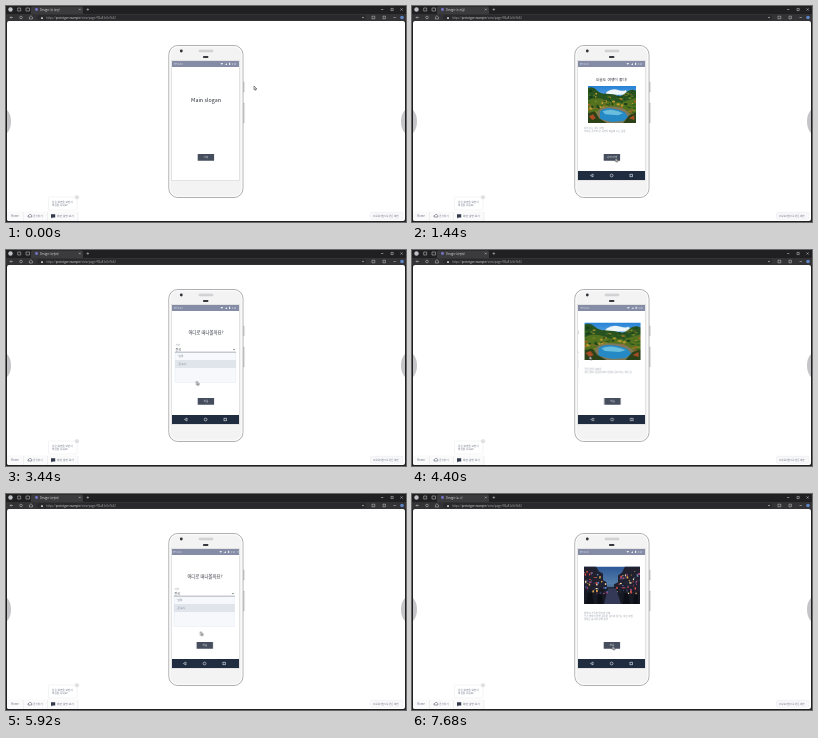
Write an HTML page that moves like this. It is 400 px wide and 216 px high and loops after 8 s.

```html
<!DOCTYPE html>
<html lang="ko">
<head>
<meta charset="utf-8">
<title>Prototype preview</title>
<style>
html, body { margin: 0; width: 100%; height: 100%; overflow: hidden; background: #fff; }
svg { display: block; }
#stage { width: 400px; height: 216px; }
text { font-family: 'Noto Sans CJK KR', 'Noto Sans', sans-serif; font-size: 2.6px; fill: #697080; }
.mid { text-anchor: middle; }
.head { font-weight: 500; fill: #252a33; text-anchor: middle; }
.note { font-size: 2.4px; fill: #959aa5; }
.btn text { fill: #e8ebf0; text-anchor: middle; }
.tab { font-size: 2.8px; fill: #dcdcdc; visibility: hidden; }

/* One percent of the loop is 80 ms. */
.page, .tab, #cursor { animation: 8s linear infinite; }
#start { animation-name: start; }
#intro { animation-name: intro; }
#pick { animation-name: pick; }
#island { animation-name: island; }
#city { animation-name: city; }
#cursor { animation-name: cursor; }
.tab { animation-timing-function: step-end; }
#tab0 { animation-name: tab0; }
#tab1 { animation-name: tab1; }
#tab2 { animation-name: tab2; }
#tab3 { animation-name: tab3; }
#tab4 { animation-name: tab4; }

@keyframes start {
  0%, 10.25% { transform: none; animation-timing-function: ease; }
  16.4%, 100% { transform: translateX(-20px); }
}
@keyframes intro {
  0%, 10.25% { transform: translateX(67px); animation-timing-function: ease; }
  16.4%, 29.03% { transform: translateX(0); animation-timing-function: ease; }
  35.15%, 100% { transform: translateX(-20px); }
}
@keyframes pick {
  0%, 29.03% { transform: translateX(67px); animation-timing-function: ease; }
  35.15%, 49.6% { transform: translateX(0); animation-timing-function: ease; }
  55.75%, 69.65% { transform: translateX(-20px); animation-timing-function: ease; }
  75.8%, 100% { transform: translateX(0); }
}
@keyframes island {
  0%, 49.6% { transform: translateX(67px); animation-timing-function: ease; }
  55.75%, 69.65% { transform: translateX(0); animation-timing-function: ease; }
  75.8%, 100% { transform: translateX(67px); }
}
@keyframes city {
  0%, 85.96% { transform: translateX(67px); }
  85.97% { transform: translateX(1.6px); }
  86.95%, 100% { transform: translateX(0); }
}
@keyframes cursor {
  0%, 0.5% { transform: translate(248px, 80px); animation-timing-function: ease-in-out; }
  6%, 19.5% { transform: translate(203.5px, 152px); animation-timing-function: ease-in-out; }
  23%, 39.5% { transform: translate(201px, 151.5px); animation-timing-function: ease-in-out; }
  47%, 58.5% { transform: translate(177.5px, 106px); animation-timing-function: ease-in-out; }
  64%, 65.5% { transform: translate(199.5px, 151px); }
  68%, 71% { transform: translate(201px, 151.5px); animation-timing-function: ease-in-out; }
  78%, 80.5% { transform: translate(184px, 115px); animation-timing-function: ease-in-out; }
  83%, 90.5% { transform: translate(179px, 113px); animation-timing-function: ease-in-out; }
  96%, 100% { transform: translate(200.5px, 152px); }
}
@keyframes tab0 { 0% { visibility: visible; } 17%, 100% { visibility: hidden; } }
@keyframes tab1 { 0% { visibility: hidden; } 17% { visibility: visible; } 35%, 100% { visibility: hidden; } }
@keyframes tab2 {
  0% { visibility: hidden; } 35% { visibility: visible; } 56% { visibility: hidden; }
  73% { visibility: visible; } 89%, 100% { visibility: hidden; }
}
@keyframes tab3 { 0% { visibility: hidden; } 56% { visibility: visible; } 73%, 100% { visibility: hidden; } }
@keyframes tab4 { 0% { visibility: hidden; } 89%, 100% { visibility: visible; } }
</style>
</head>
<body>
<svg id="stage" viewBox="0 0 400 216">
  <defs>
    <clipPath id="screen"><rect x="166" y="55" width="67" height="119"/></clipPath>
    <linearGradient id="sky" x2="0" y2="1"><stop stop-color="#2582d6"/><stop offset="1" stop-color="#d6ebf7"/></linearGradient>
    <linearGradient id="dusk" x2="0" y2="1"><stop stop-color="#2d5796"/><stop offset=".45" stop-color="#547da9"/><stop offset="1" stop-color="#171824"/></linearGradient>

    <symbol id="lagoon" viewBox="0 0 56 38" preserveAspectRatio="none">
      <rect width="56" height="38" fill="url(#sky)"/>
      <path d="M22 6q6-4 13-2t9 0l3 5H20z" fill="#eef5f8"/>
      <path d="M0 2q6-2 10 2t12 4 12 2 10-3 12-2v33H0z" fill="#285321"/>
      <path d="M0 15q10-5 21 0t35-3v26H0z" fill="#55721f"/>
      <g id="leaves"/>
      <path d="M12 25q4-4 14-4t17 3l7 5-3 9H10l-2-5z" fill="#80785a"/>
      <path d="M14 26q5-4 14-3t15 4l4 5-6 4-13 1-14-3z" fill="#2489c4"/>
      <path d="M17 26q10-4 24 2l-6 2-15-1z" fill="#69bddd"/>
      <path d="M0 28l8-2 5 7 9 5H0zM56 27l-8 3-7 8h15z" fill="#2b4218"/>
      <path d="M1 31l5-2 3 4-4 2zM48 33l6-3v5z" fill="#a94b25"/>
    </symbol>

    <symbol id="night" viewBox="0 0 56 38" preserveAspectRatio="none">
      <rect width="56" height="38" fill="url(#dusk)"/>
      <path d="M0 0h12l3 5 4 2v7l4 2v9H0zM56 0H41l-3 6-4 3v7l-4 2v7h26z" fill="#20202e"/>
      <path d="M0 24l23-3h9l24 4v13H0z" fill="#171923"/>
      <path d="M24 22h8l5 16H20z" fill="#343957"/>
      <g id="lights"/>
      <path d="M2 38l2-11 4-1 2 12zM13 38l1-10h4l1 10zM39 38l1-11h4l2 11zM49 38l1-9h4v9z" fill="#0d0f17"/>
    </symbol>

    <g id="bar">
      <rect x="166" y="55" width="67" height="6" fill="#858ca6"/>
      <text x="168" y="59" style="font-size:2.3px;fill:#e6e8ef">PM 5:20</text>
      <path d="M214.5 57h2.6l-1.3 2zM219 59l2-2v2zM223 56.8h1.2v2.3H223z" fill="#eef0f5"/>
      <text x="226" y="59" style="font-size:2.2px;fill:#eef0f5">5:20</text>
    </g>
    <g id="nav">
      <rect x="166" y="165" width="67" height="9" fill="#202c3f"/>
      <g fill="none" stroke="#e8ebf0" stroke-width=".6">
        <path d="M181 168l-2.5 1.5 2.5 1.5z"/>
        <circle cx="199.6" cy="169.5" r="1.4"/>
        <rect x="218" y="168.2" width="2.6" height="2.6"/>
      </g>
    </g>
    <g id="blank"><rect x="166" y="55" width="67" height="119" fill="#fff"/><use href="#bar"/></g>
    <rect id="key" x="191.7" y="148" width="16.4" height="6.8" rx=".4" fill="#464e5d"/>
  </defs>

  <!-- browser -->
  <rect width="400" height="216" fill="#202022"/>
  <path d="M0 8h400v7H0z" fill="#333335"/>
  <path d="M25 8V2q0-1.5 1.5-1.5h49Q77 .5 77 2v6z" fill="#3b3b3d"/>
  <circle cx="4.5" cy="3.5" r="2.2" fill="#bfc2c6"/>
  <path d="M11.7 2h3v3h-3zM20 2h3.5v3H20z" fill="none" stroke="#b4b4b4" stroke-width=".6"/>
  <circle cx="30.5" cy="3.5" r="1.4" fill="#7676d0"/>
  <text class="tab" id="tab0" x="34" y="4.6">Design (첫 화면)</text>
  <text class="tab" id="tab1" x="34" y="4.6">Design (소개글)</text>
  <text class="tab" id="tab2" x="34" y="4.6">Design (여행지)</text>
  <text class="tab" id="tab3" x="34" y="4.6">Design (섬)</text>
  <text class="tab" id="tab4" x="34" y="4.6">Design (도시)</text>
  <g fill="none" stroke="#c4c4c4" stroke-width=".55">
    <path d="M73 2.7l1.6 1.6m0-1.6L73 4.3M80.5 3.5h2.6m-1.3-1.3v2.6M375 3.5h2.4M385 2.4h2.2v2.2H385zM394.5 2.4l2.2 2.2m0-2.2l-2.2 2.2"/>
    <path d="M7 11.5H4m1.2-1.2L4 11.5l1.2 1.2M23.4 13v-2l1.5-1.2 1.5 1.2v2z"/>
    <circle cx="15" cy="11.5" r="1.3"/>
    <path d="M366 10.2h2.8v2.6H366zM377 10.2h2.4v2.6H377zM387.5 11.5h2.4"/>
  </g>
  <rect x="31" y="9" width="329" height="5" rx="2.5" fill="#29292b"/>
  <path d="M35 11.3h2v1.6h-2z" fill="#bbb"/>
  <circle cx="357" cy="11.5" r=".8" fill="#aaa"/>
  <circle cx="396" cy="11.5" r="1.8" fill="#5e87c9"/>
  <text x="40" y="12.6" style="font-size:2.8px;fill:#a9a9ab">https://<tspan fill="#dedede">prototype.example</tspan>/view/page/4f2a81c0e7b52</text>
  <rect x="1" y="15" width="398" height="200" rx="2" fill="#fff"/>

  <!-- viewer controls -->
  <path d="M1 104q4 4 4 11.5T1 127zM399 104q-4 4-4 11.5t4 11.5z" fill="#c5c5c7"/>
  <path d="M1 205.5h71V215H3q-2 0-2-2z" fill="#fafafb"/>
  <path d="M17.5 206v9M41.5 206v9M72 206v9" stroke="#e7e8ec" stroke-width=".6"/>
  <text x="5" y="211.2" style="font-size:2.8px">Home</text>
  <path d="M22 211q-.6-1.6 1-1.8.6-1.6 2-.4 1.4.4.8 2.2z" fill="none" stroke="#555d6b" stroke-width=".6"/>
  <text x="27" y="211.2">공유하기</text>
  <path d="M45 208.3h4.2v3.2h-2.5l-1.2 1v-1H45z" fill="#30384a"/>
  <text x="51" y="211.2" style="font-size:2.75px">화면 설명 보기</text>
  <rect x="42.5" y="191" width="28.5" height="13" rx="1" fill="#fff" stroke="#e8e9ed" stroke-width=".5"/>
  <text x="46" y="196.6" fill="#555d6b">같은 화면을 보면서</text>
  <text x="46" y="200.4">의견을 나눠요!</text>
  <circle cx="71" cy="191.2" r="1.8" fill="#f2f2f4" stroke="#c5c7cc" stroke-width=".4"/>
  <path d="M70.4 190.6l1.2 1.2m0-1.2l-1.2 1.2" stroke="#888" stroke-width=".35"/>
  <rect x="364.5" y="206.3" width="32.5" height="7" rx="1" fill="#f8f8fa" stroke="#e5e6ea" stroke-width=".4"/>
  <text x="367" y="211" style="font-size:2.4px">프로토타입으로 만든 화면</text>

  <!-- phone -->
  <path d="M237.2 76h1v10h-1zM237.2 97h1v20h-1z" fill="#ddd" stroke="#aaa" stroke-width=".4"/>
  <rect x="162.8" y="39.5" width="74.2" height="152" rx="9" fill="#f3f3f4" stroke="#a9a9ab" stroke-width=".9"/>
  <rect x="164" y="40.7" width="71.8" height="149.6" rx="8" fill="none" stroke="#fff" stroke-width=".8"/>
  <circle cx="175.3" cy="45" r="1.4" fill="#303135"/>
  <rect x="193" y="44" width="14" height="1.9" rx=".9" fill="#dadadd" stroke="#b5b5b8" stroke-width=".4"/>
  <rect x="197" y="50" width="5.4" height="2" rx=".7" fill="#37383c"/>
  <rect x="165.7" y="54.7" width="67.6" height="119.6" fill="#fff" stroke="#cfcfd2" stroke-width=".5"/>

  <g clip-path="url(#screen)">
    <g class="page" id="start">
      <use href="#blank"/>
      <text class="head" x="200" y="95.6" style="font-size:5.3px">Main slogan</text>
      <g class="btn"><use href="#key"/><text x="200" y="152.4">시작</text></g>
    </g>
    <g class="page" id="intro">
      <use href="#blank"/><use href="#nav"/>
      <text class="head" x="199.5" y="75" style="font-size:3.8px">오늘도 여행이 좋다!</text>
      <use href="#lagoon" x="176" y="80" width="48" height="37"/>
      <text class="note" x="172" y="122.8">쉬어 가는 하루 여행</text>
      <text class="note" x="172" y="126.2">가까운 곳부터 먼 곳까지 마음에 드는 길을</text>
      <g class="btn"><use href="#key"/><text x="200" y="152.4">나의 여행</text></g>
    </g>
    <g class="page" id="pick">
      <use href="#blank"/><use href="#nav"/>
      <text class="head" x="200" y="83.5" style="font-size:4.35px">어디로 떠나볼까요?</text>
      <text class="note" x="169.5" y="96.2">지역</text>
      <text x="169.5" y="100.7" style="font-size:3px;font-weight:500;fill:#30343c">전국</text>
      <path d="M227 99h2l-1 1.2z" fill="#555"/>
      <rect x="169" y="102" width="61" height="30.5" fill="#f6f8fc" stroke="#e2e6ed" stroke-width=".4"/>
      <path d="M169 102.2h61" stroke="#858b97" stroke-width=".6"/>
      <rect x="169" y="110" width="61" height="8" fill="#e0e5ec"/>
      <text x="172.5" y="107.3">남쪽</text>
      <text x="172.5" y="115.2">큰 도시</text>
      <g class="btn"><use href="#key"/><text x="200" y="152.4">처음</text></g>
    </g>
    <g class="page" id="island">
      <use href="#blank"/><use href="#nav"/>
      <use href="#lagoon" x="172" y="72.5" width="56" height="37.5"/>
      <text class="note" x="172" y="119.9">푸른 남쪽 섬마을</text>
      <text class="note" x="172" y="123.4">맑은 물과 숲길을 따라 천천히 걸어 보는 하루 길</text>
      <g class="btn"><use href="#key"/><text x="200" y="152.4">처음</text></g>
    </g>
    <g class="page" id="city">
      <use href="#blank"/><use href="#nav"/>
      <use href="#night" x="172" y="72.5" width="56" height="37.5"/>
      <text class="note" x="172" y="119.9">불빛이 가득한 밤거리 산책</text>
      <text class="note" x="172" y="123.1">늦은 밤까지 환한 골목을 걸으며 즐기는 작은 여행</text>
      <text class="note" x="172" y="126.3">맛있는 음식과 강변 풍경</text>
      <g class="btn"><use href="#key"/><text x="200" y="152.4">처음</text></g>
    </g>
  </g>

  <path id="cursor" d="M0 0v3.7l.9-.8.6 1.4.7-.3-.6-1.3h1.2z" fill="#fff" stroke="#222" stroke-width=".5"/>
</svg>
<script>
let seed = 7;
const rand = () => (seed = seed * 16807 % 2147483647) / 2147483647;
const pickFrom = list => list[Math.floor(rand() * list.length)];

function add(parent, name, attrs) {
  const node = document.createElementNS(parent.namespaceURI, name);
  for (const key in attrs) node.setAttribute(key, attrs[key]);
  parent.append(node);
}

const leaves = document.getElementById('leaves');
for (let i = 0; i < 120; i++) {
  const x = rand() * 56;
  add(leaves, 'ellipse', {
    cx: x, cy: 8 + Math.abs(x - 28) / -9 + rand() * 25,
    rx: 0.7 + rand() * 1.6, ry: 0.5 + rand() * 0.9,
    fill: pickFrom(['#183e19', '#31651f', '#7a8c22', '#b89a32', '#24501f', '#9c6529'])
  });
}

const lights = document.getElementById('lights');
for (let i = 0; i < 110; i++) {
  const side = rand() < 0.5;
  const depth = rand();
  const x = depth * 23;
  add(lights, 'rect', {
    x: side ? x : 55 - x, y: 3 + depth * 8 + rand() * (24 - depth * 8),
    width: 0.5 + rand() * 1.7, height: 0.5 + rand() * 2,
    fill: pickFrom(['#e5a649', '#d94b44', '#5b84d4', '#f2dfb1', '#a34679', '#363b60', '#282b3f'])
  });
}
</script>
</body>
</html>
```
